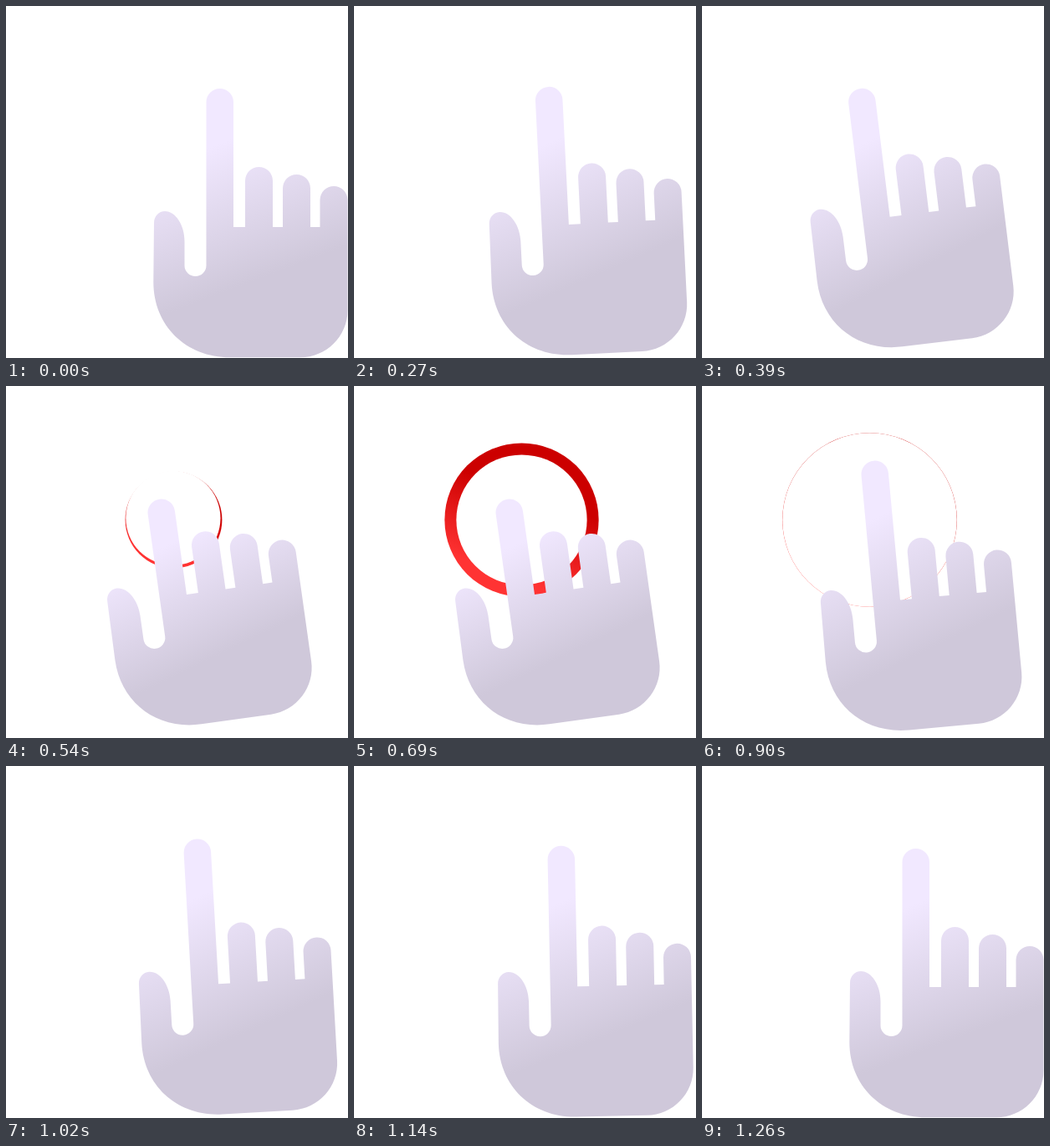
Recreate the animation shown at these times as an HTML page with a canvas. Size 409x422 px, loop 1740 ms.

```html
<!DOCTYPE html>
<html lang="en">
<head>
<meta charset="utf-8">
<title>Tap gesture</title>
<style>
  html, body { margin: 0; width: 100%; height: 100%; overflow: hidden; background: #fff; }
  canvas { display: block; }
</style>
</head>
<body>
<canvas id="stage" width="409" height="422"></canvas>
<script>
const ctx = document.getElementById('stage').getContext('2d');
const LOOP = 1740, STEP = 30;
const PIVOT = { x: 272, y: 265 };

// Smooth monotone curve through [time, value] keys.
function track(keys) {
  const last = keys.length - 1;
  const slope = i => (keys[i + 1][1] - keys[i][1]) / (keys[i + 1][0] - keys[i][0]);
  const tangent = i => {
    if (i === 0 || i === last) return 0;
    const a = slope(i - 1), b = slope(i);
    return a * b <= 0 ? 0 : 2 * a * b / (a + b);
  };
  return t => {
    if (t <= keys[0][0]) return keys[0][1];
    if (t >= keys[last][0]) return keys[last][1];
    const i = keys.findIndex(k => k[0] > t) - 1;
    const [t0, v0] = keys[i], [t1, v1] = keys[i + 1];
    const h = t1 - t0, u = (t - t0) / h, w = 1 - u;
    return v0 * w * w * (1 + 2 * u) + v1 * u * u * (3 - 2 * u)
      + h * u * w * (w * tangent(i) - u * tangent(i + 1));
  };
}

const tilt = track([[130, 0], [270, 2.85], [450, 8], [690, 8], [900, 5.3], [1020, 3.25], [1200, 0.4], [1260, 0]]);
const shift = track([[130, 0], [270, 0.27], [450, 1], [690, 1], [900, 0.625], [1020, 0.32], [1200, 0.02], [1260, 0]]);
const press = track([[340, 0], [520, 48.3], [690, 48.3], [900, -3], [1000, -9], [1020, -8.8], [1200, -0.4], [1250, 0]]);
const ringWidth = track([[522, 0], [540, 1.3], [690, 14], [900, 0.1], [930, 0]]);

function gradient(x0, y0, x1, y1, from, to) {
  const g = ctx.createLinearGradient(x0, y0, x1, y1);
  g.addColorStop(0, from);
  g.addColorStop(1, to);
  return g;
}

function disc(x, y, r, fill) {
  ctx.beginPath();
  ctx.arc(x, y, r, 0, Math.PI * 2);
  ctx.fillStyle = fill;
  ctx.fill();
}

function drawRing(t) {
  const width = ringWidth(t);
  if (width <= 0) return;
  const x = 200.5, y = 160.5;
  const left = Math.max(0, 1 - (t - 530) / 430);
  const r = 104.5 - 50 * left ** 3;
  const skew = Math.min(1, Math.max(0, (690 - t) / 150));
  disc(x, y, r, gradient(x - 0.26 * r, y + 0.7 * r, x + 0.12 * r, y - 0.33 * r, '#ff3333', '#cc0000'));
  disc(x - 0.6 * skew, y - 2.2 * skew, r - width, '#fff');
}

function finger(left, right, top) {
  const r = (right - left) / 2;
  ctx.lineTo(left, PIVOT.y);
  ctx.arc(left + r, top + r, r, Math.PI, 0);
}

function drawHand(t) {
  const move = shift(t), top = 99 + press(t);
  ctx.save();
  ctx.translate(PIVOT.x - 56 * move, PIVOT.y - 15 * move ** 1.2);
  ctx.rotate(-tilt(t) * Math.PI / 180);
  ctx.translate(-PIVOT.x, -PIVOT.y);

  ctx.beginPath();
  finger(239.5, 272, top);
  ctx.lineTo(272, PIVOT.y);
  finger(286, 319, 193);
  ctx.lineTo(319, PIVOT.y);
  finger(331, 364, 202);
  ctx.lineTo(364, PIVOT.y);
  finger(375.5, 408.5, 216);
  ctx.lineTo(408.5, 365);
  ctx.bezierCurveTo(408.5, 396, 383, 421.3, 352, 421.3);
  ctx.lineTo(268, 421.3);
  ctx.bezierCurveTo(215, 421.3, 176.3, 383, 176.3, 331);
  ctx.lineTo(177, 260);
  ctx.bezierCurveTo(177, 252, 183, 246, 190, 246);
  ctx.bezierCurveTo(203, 246, 213.5, 263, 213.5, 282);
  ctx.lineTo(213.5, 311);
  ctx.arc(226.5, 311, 13, Math.PI, 0, true);
  ctx.closePath();

  // The shading stretches with the hand's bounding box.
  ctx.translate(176.3, top);
  ctx.scale(232.2, 421.3 - top);
  ctx.fillStyle = gradient(0, 0.298, 0.1425, 0.818, '#f1e8ff', '#cfc8da');
  ctx.fill();
  ctx.restore();
}

function draw(now) {
  const t = Math.floor((now % LOOP) / STEP) * STEP;
  ctx.fillStyle = '#fff';
  ctx.fillRect(0, 0, 409, 422);
  drawRing(t);
  drawHand(t);
}

let start = null;
function tick(now) {
  if (start === null) start = now;
  draw(now - start);
  requestAnimationFrame(tick);
}
draw(0);
requestAnimationFrame(tick);
</script>
</body>
</html>
```
